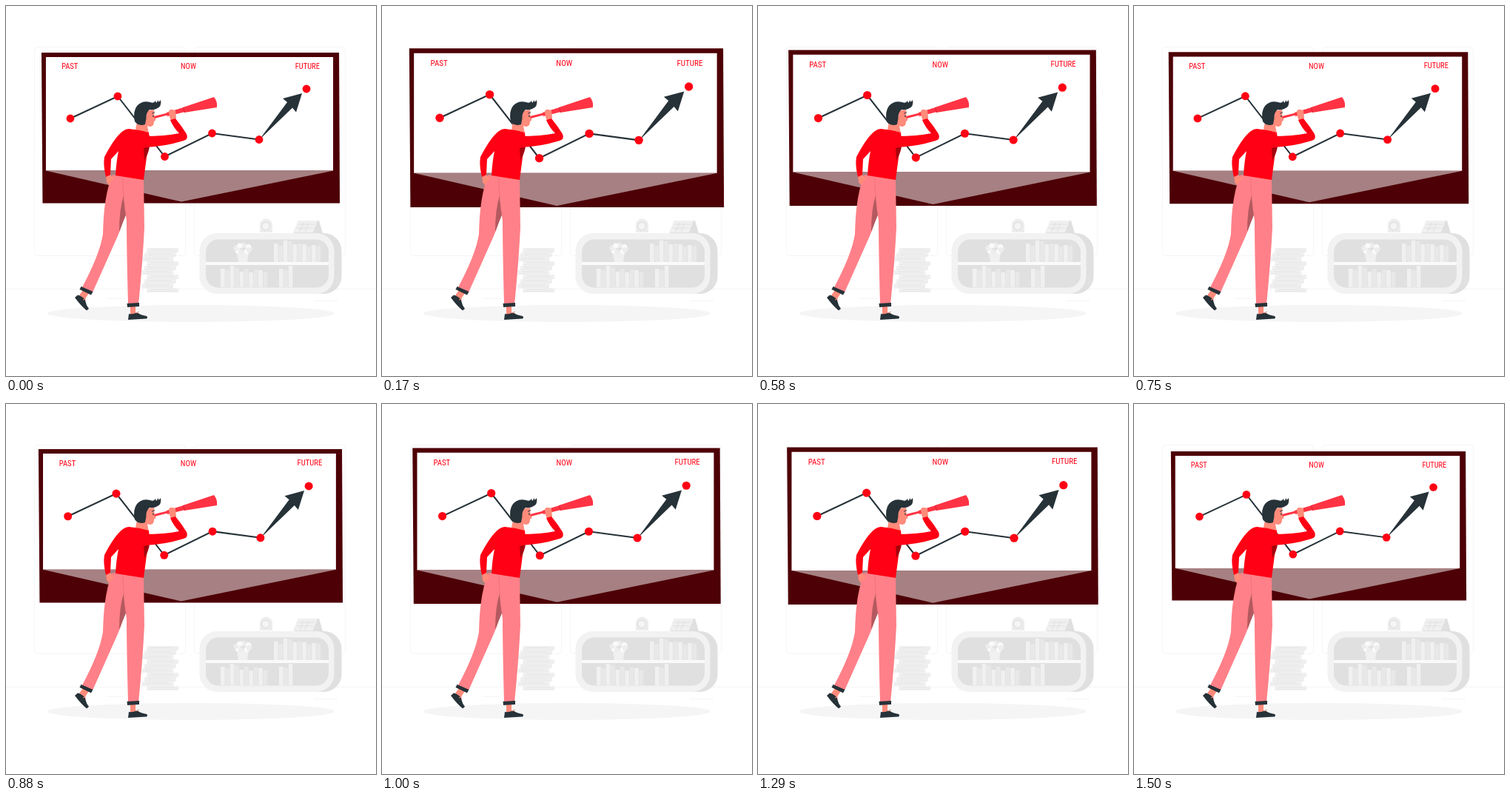
Write an HTML page that moves like this. It is 500 px wide and 500 px high and loops after 1540 ms.

```html
<!DOCTYPE html>
<html lang="en">
<head>
<meta charset="utf-8">
<title>Past, now, future</title>
<style>
  html, body { margin: 0; height: 100%; overflow: hidden; background: #fff; }
  svg { display: block; width: 100vw; height: 100vh; }
  text { font: 10.5px "Roboto Condensed", Roboto, sans-serif; font-stretch: 75%; text-anchor: middle; }
  .red { fill: #ff0014; }
  .dark { fill: #263238; }
  .skin { fill: #ff8b7b; }
  .pants { fill: #ff8088; }
  .scope { fill: #ff3343; }
  .line { fill: none; stroke: #263238; stroke-width: 2; }
  .faint { fill: none; stroke: #f5f5f5; }
</style>
</head>
<body>
<svg viewBox="0 0 500 500">
  <g id="room">
    <rect class="faint" x="38.5" y="55.500" width="204" height="282" rx="4"/>
    <rect class="faint" x="254.500" y="55.500" width="204" height="282" rx="4"/>
    <path class="faint" d="M0 382.500H500M136 395.500H160M416 398.500H448"/>
    <ellipse cx="250" cy="415.500" rx="194" ry="11.500" fill="#f5f5f5"/>
    <rect x="280" y="307" width="173.500" height="82" rx="24" fill="#e0e0e0"/>
    <rect x="261.500" y="307" width="182" height="82" rx="24" fill="#f2f2f2"/>
    <rect x="270" y="315.500" width="166" height="65" rx="17" fill="#e0e0e0"/>
    <path d="M270 346h166v4H270z" fill="#fafafa"/>
    <path d="M343 306v-10a8.500 8.500 0 0 1 17 0v10z" fill="#ededed"/>
    <circle cx="351" cy="297.500" r="6" fill="#e0e0e0"/>
    <circle cx="351" cy="297.500" r="4.500" fill="#f5f5f5"/>
    <path d="M395 290h28l5 17h-39z" fill="#e0e0e0"/>
    <path d="M395 290h26l-6 16h-27z" fill="#f0f0f0"/>
    <path d="M395 295h22M393 300h22M402 293l-5 12M409 293l-5 12" stroke="#e0e0e0" fill="none"/>
    <path d="M312 333h16l-2 13h-12z" fill="#f0f0f0"/>
  </g>

  <g id="board">
    <path d="M48 63H450L451 266.500H49.500Z" fill="#4d0006"/>
    <path d="M54 69H442V222.500H54Z" fill="#fff"/>
    <path d="M54 222.500H442.500L237 264.500Z" fill="#a68083"/>
    <g class="red">
      <text x="86.300" y="85.500">PAST</text>
      <text x="246.500" y="85.500">NOW</text>
      <text x="407.300" y="85">FUTURE</text>
    </g>
    <path class="line" d="M87 152L151 122L214.500 203.500L278.500 172L342 180.500"/>
    <path class="dark" d="M342 181L380 130L374 125L400 118L392 143.500L387 137.500Z"/>
    <g id="dots" class="red"></g>
  </g>

  <g id="man">
    <!-- legs -->
    <path class="pants" d="M144 228L163 231L162 265Q160 292 150 313L117 387L103 380Q127 335 131 308Q132 255 144 228Z"/>
    <path d="M159 256L163 280L153 305Q153 275 159 256Z" fill="#b3595f"/>
    <path class="pants" d="M157 229L186 234L187 300Q184 355 179 403H165Q163 330 163 290Q158 260 157 229Z"/>
    <path d="M158 232Q158 250 160 260" fill="none" stroke="#e66b74" stroke-width=".6"/>
    <path class="skin" d="M104 384L112 388L106 397L99 391ZM168 405H175V417H168Z"/>
    <path class="dark" d="M101.500 379L117.500 386L115 390.500L99.500 383ZM163.500 402L180 401V406L164 407Z"/>
    <path class="dark" d="M93 394L97 390.500Q103 392 107 397Q108 404 112 409L109 411.500Q101 405 93 394ZM166 416Q172 417 177 414Q182 418 190 419Q192 421 190 422.500L165 424Z"/>
    <path d="M104 397l4-1M176 415l4-2" stroke="#ff8b7b" fill="none"/>
    <!-- body -->
    <path class="skin" d="M135 229L141 228L146 233L143 237L139 242L136 238ZM177 157H190L193 172L175 167Z"/>
    <path class="red" d="M166 166Q180 167 193 171Q195 182 191 197L186 235L148 229Q149 211 152 196L142 207L141 228L135 231Q131 215 133 204Q147 177 158 169Q162 166 166 166Z"/>
    <path d="M186 192L194 190Q192 201 187 208Z" fill="#a6000d"/>
    <!-- head -->
    <path class="skin" d="M188 142L200 140L200.500 148L202.500 154L200 156Q200 163 195 163Q190 163 186 160Z"/>
    <path class="dark" d="M174 156Q171 143 177 135Q184 127 195 130Q200 132 202 128L203 131L206 127L206 130L209 127Q211 136 203 139Q198 141 194 140Q190 143 190 149L188 160Q179 163 174 156Z"/>
    <ellipse class="skin" cx="192.500" cy="149" rx="3" ry="4.500"/>
    <path class="dark" d="M197 145l4-2v1l-4 2zM198.300 147.500h1.200v2.500h-1.200z"/>
    <!-- telescope and raised arm -->
    <path class="scope" d="M200 149L218 144.500V147.500L201 152ZM217 144L240 137L242 143L218 149ZM239 137L281 123Q286 129 285 137L241 144Z"/>
    <path d="M239.500 137L241.500 144" stroke="#d91f30" fill="none"/>
    <path class="skin" d="M220 143Q221 139 225 140L229 141L230 152L223 155L221 150Z"/>
    <path class="red" d="M186 176Q215 176 234 172Q226 164 222 154L229 152Q238 163 244 173Q247 180 240 182Q214 190 188 191Z"/>
    <path d="M234 172l4-5" stroke="#a6000d" stroke-width=".7"/>
  </g>
</svg>
<script>
  const svgNS = "http://www.w3.org/2000/svg";
  const room = document.getElementById("room");
  const board = document.getElementById("board");

  function add(parent, tag, attrs) {
    const node = document.createElementNS(svgNS, tag);
    for (const name in attrs) node.setAttribute(name, attrs[name]);
    parent.append(node);
  }

  const points = [[87, 152], [151, 122], [214.5, 203.5], [278.5, 172], [342, 180.5], [406, 112]];
  for (const [cx, cy] of points) add(document.getElementById("dots"), "circle", { cx, cy, r: 5.4 });

  // Upright books: x, base line, heights
  const rows = [
    [362, 346, [25, 22, 29, 28, 24, 25, 24, 21, 23, 22]],
    [290, 380, [25, 23, 29, 27, 21, 25, 20, 24, 23, 20]],
    [369, 380, [25, 23, 29]]
  ];
  for (const [x, base, heights] of rows) {
    heights.forEach((height, i) => add(room, "rect", {
      x: x + i * 6.4, y: base - height, width: 5.6, height,
      fill: i % 2 ? "#e8e8e8" : "#f0f0f0"
    }));
  }

  // Flower heads
  for (let i = 0; i < 9; i++) {
    add(room, "circle", {
      cx: 320 + 9 * Math.cos(i * 2.4), cy: 328 + 4.5 * Math.sin(i * 2.4), r: 3.6,
      fill: i % 2 ? "#fafafa" : "#ededed"
    });
  }

  // Stack of books on the floor
  for (let i = 0; i < 10; i++) {
    const x = 187 + 4 * Math.sin(i * 2.1 + 1), y = 327 + i * 6;
    add(room, "rect", { x, y, width: 43, height: 5.2, rx: 1, fill: "#f0f0f0" });
    add(room, "path", { d: `M${x} ${y + 5}h42M${x + 5} ${y + 2}h32`, stroke: "#e3e3e3", fill: "none" });
  }

  // Board pulse: time in ms, scale
  const LOOP = 1540;
  const pulse = [
    [0, 1], [170, 1.055], [280, 1.09], [380, 1.067], [750, 1.0063],
    [1000, 1.033], [1150, 1.09], [1290, 1.044], [1500, 0.9906], [LOOP, 1]
  ];

  function scaleAt(time) {
    const next = pulse.findIndex(([at]) => at > time);
    const [t0, s0] = pulse[next - 1], [t1, s1] = pulse[next];
    return s0 + (s1 - s0) * (time - t0) / (t1 - t0);
  }

  function draw() {
    const scale = scaleAt(performance.now() % LOOP);
    board.setAttribute("transform", `translate(250 165) scale(${scale}) translate(-250 -165)`);
    requestAnimationFrame(draw);
  }
  draw();
</script>
</body>
</html>
```
